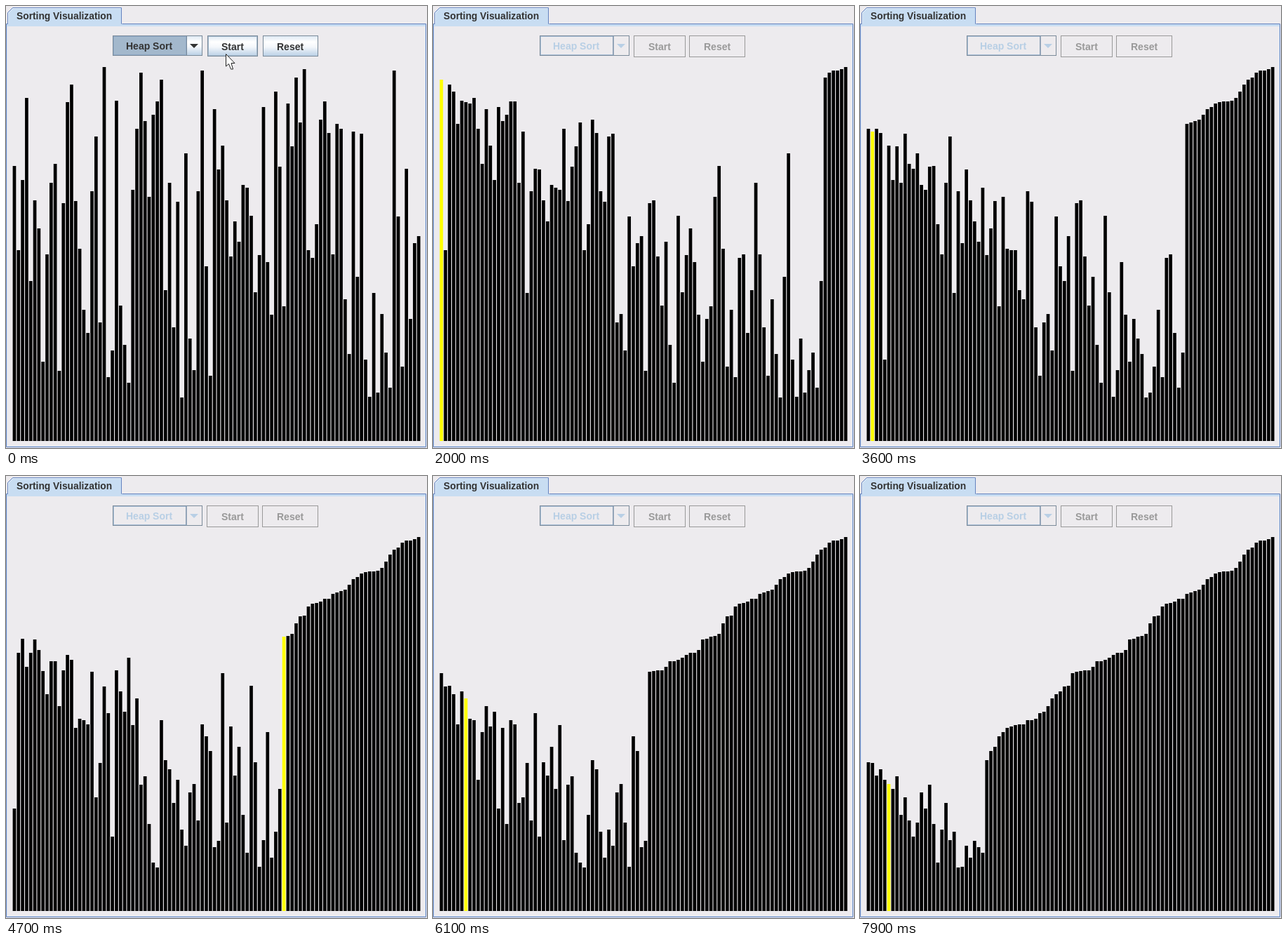
An HTML page with a canvas for the animation above (8000 ms loop, 600 px wide and 630 px high).

```html
<!DOCTYPE html>
<html lang="en">
<head>
<meta charset="utf-8">
<title>Sorting Visualization</title>
<style>
  html, body { margin: 0; width: 100%; height: 100%; overflow: hidden; background: #edebee; }
  svg, canvas { position: absolute; left: 0; top: 0; width: 600px; height: 630px; }
  text { font: bold 14px "Liberation Sans", Arial, sans-serif; fill: #333; }
  .tab { font-size: 13.8px; }
  .edge { fill: none; stroke: #6382bf; }
  .btn { fill: url(#shine); stroke: #7a8a99; }
  .off rect { fill: none; stroke: #999; }
  .off text { fill: #999; }
  .off .combo { stroke: #7a8a99; }
  .off .pale { fill: #b8cfe5; }
  .running .on, svg:not(.running) .off { display: none; }
</style>
</head>
<body>
<canvas id="bars" width="600" height="630"></canvas>
<svg id="ui" viewBox="0 0 600 630">
  <defs>
    <linearGradient id="shine" x1="0" y1="0" x2="0" y2="1">
      <stop offset="0" stop-color="#dde8f3"/>
      <stop offset=".3" stop-color="#fff"/>
      <stop offset=".55" stop-color="#f4f7fb"/>
      <stop offset="1" stop-color="#b8cfe5"/>
    </linearGradient>
  </defs>

  <rect x="1" y="26" width="598" height="3" fill="#c8ddf2"/>
  <path d="M1.5 29V627.5H597.5V29" fill="none" stroke="#d5e3f3"/>
  <path class="edge" d="M0.5 25.5H598.5V628.5H0.5Z"/>
  <path d="M2.5 27V9.5L9.5 2.5H164.5V25.5H166V27Z" fill="#c8ddf2"/>
  <path class="edge" d="M2.5 25.5V9.5L9.5 2.5H164.5V25.5"/>
  <path d="M3.5 25V10L10 3.5H163.5" fill="none" stroke="#e6eff9"/>
  <text class="tab" x="15" y="19">Sorting Visualization</text>

  <g class="on">
    <rect class="btn" x="152.5" y="42.5" width="127" height="28"/>
    <rect x="153.5" y="43.5" width="103" height="26" fill="#a3b8cc" stroke="#8fa9c6"/>
    <path d="M257.5 42V71" stroke="#7a8a99"/>
    <path d="M262 54H274L268 60Z" fill="#333"/>
    <text x="171" y="62">Heap Sort</text>
    <rect class="btn" x="287.5" y="42.5" width="71" height="29"/>
    <rect x="288.5" y="43.5" width="69" height="27" fill="none" stroke="#a3b8cc"/>
    <text x="307" y="63">Start</text>
    <rect class="btn" x="366.5" y="42.5" width="78" height="29"/>
    <text x="386" y="63">Reset</text>
    <path d="M313.5 68.5V86L317.5 82.5L320.5 90H323.5L321 81.5H326Z" fill="#fff" stroke="#222"/>
  </g>

  <g class="off">
    <rect class="combo" x="152.5" y="42.5" width="127" height="28"/>
    <rect x="153.5" y="43.5" width="103" height="26" style="stroke:#a9bfd8"/>
    <path d="M257 42V71" stroke="#7f93aa" stroke-width="1.5"/>
    <path class="pale" d="M262 54H274L268 60Z"/>
    <text class="pale" x="171" y="62">Heap Sort</text>
    <rect x="286.5" y="42.5" width="73" height="30"/>
    <text x="307" y="63">Start</text>
    <rect x="365.5" y="42.5" width="79" height="30"/>
    <text x="386" y="63">Reset</text>
  </g>
</svg>
<script>
const LOOP = 8000, TICK = 100, BASE = 620, PITCH = 5.82;

// y of each bar's top edge; a smaller number is a taller bar
const tops = [
  228, 348, 248, 131, 392, 277, 317, 507, 354, 252, 225, 520, 281, 137, 112, 278, 346, 433, 466, 264,
  186, 451, 87, 529, 491, 135, 427, 483, 537, 262, 175, 95, 164, 272, 155, 136, 105, 405, 252, 458,
  279, 558, 210, 474, 519, 264, 92, 371, 527, 147, 233, 199, 277, 357, 307, 336, 255, 259, 299, 408,
  355, 144, 365, 440, 122, 229, 428, 139, 200, 102, 166, 90, 348, 359, 311, 162, 136, 181, 354, 168,
  175, 418, 496, 179, 386, 182, 504, 557, 409, 551, 439, 494, 544, 92, 300, 514, 232, 446, 338, 328
];

// Heap sort, recording the bars after every swap
function record(start) {
  const a = start.slice();
  const steps = [{ bars: start, mark: -1, size: a.length }];

  function swap(i, j, mark, size) {
    [a[i], a[j]] = [a[j], a[i]];
    steps.push({ bars: a.slice(), mark, size });
  }
  function sift(i, size) {
    for (;;) {
      let best = i;
      for (const kid of [2 * i + 1, 2 * i + 2])
        if (kid < size && a[kid] < a[best]) best = kid;
      if (best === i) return;
      swap(i, best, i, size);
      i = best;
    }
  }

  for (let i = a.length / 2 - 1; i >= 0; i--) sift(i, a.length);
  for (let end = a.length - 1; end > 0; end--) {
    swap(0, end, end, end);
    sift(0, end);
  }
  return steps;
}

const steps = record(tops);

function locate(size, mark) {
  const k = steps.findIndex(s => s.size === size && s.mark === mark);
  return k < 0 ? steps.findIndex(s => s.size === size) : k;
}

// [tick, step]: the sort runs at an almost even pace between these
const pace = [
  [3, 1], [12, 55], [28, locate(86, 86)], [36, locate(78, 1)],
  [47, locate(66, 66)], [61, locate(51, 6)], [79, locate(29, 5)]
];

function stepAt(tick) {
  if (tick < pace[0][0]) return 0;
  for (let k = 1; k < pace.length; k++) {
    const [t0, s0] = pace[k - 1], [t1, s1] = pace[k];
    if (tick <= t1) return Math.round(s0 + (s1 - s0) * (tick - t0) / (t1 - t0));
  }
  return pace[pace.length - 1][1];
}

const ui = document.getElementById("ui");
const ctx = document.getElementById("bars").getContext("2d");

function draw(tick) {
  const { bars, mark } = steps[stepAt(tick)];
  ui.classList.toggle("running", tick >= pace[0][0]);
  ctx.clearRect(0, 0, 600, 630);
  bars.forEach((top, i) => {
    ctx.fillStyle = i === mark ? "#ff0" : "#000";
    ctx.fillRect(9.6 + i * PITCH, top, 4.7, BASE - top);
  });
}

const begun = performance.now();
let shown = -1;

function frame() {
  const tick = Math.floor((performance.now() - begun) % LOOP / TICK);
  if (tick !== shown) draw(shown = tick);
  requestAnimationFrame(frame);
}
frame();
</script>
</body>
</html>
```
